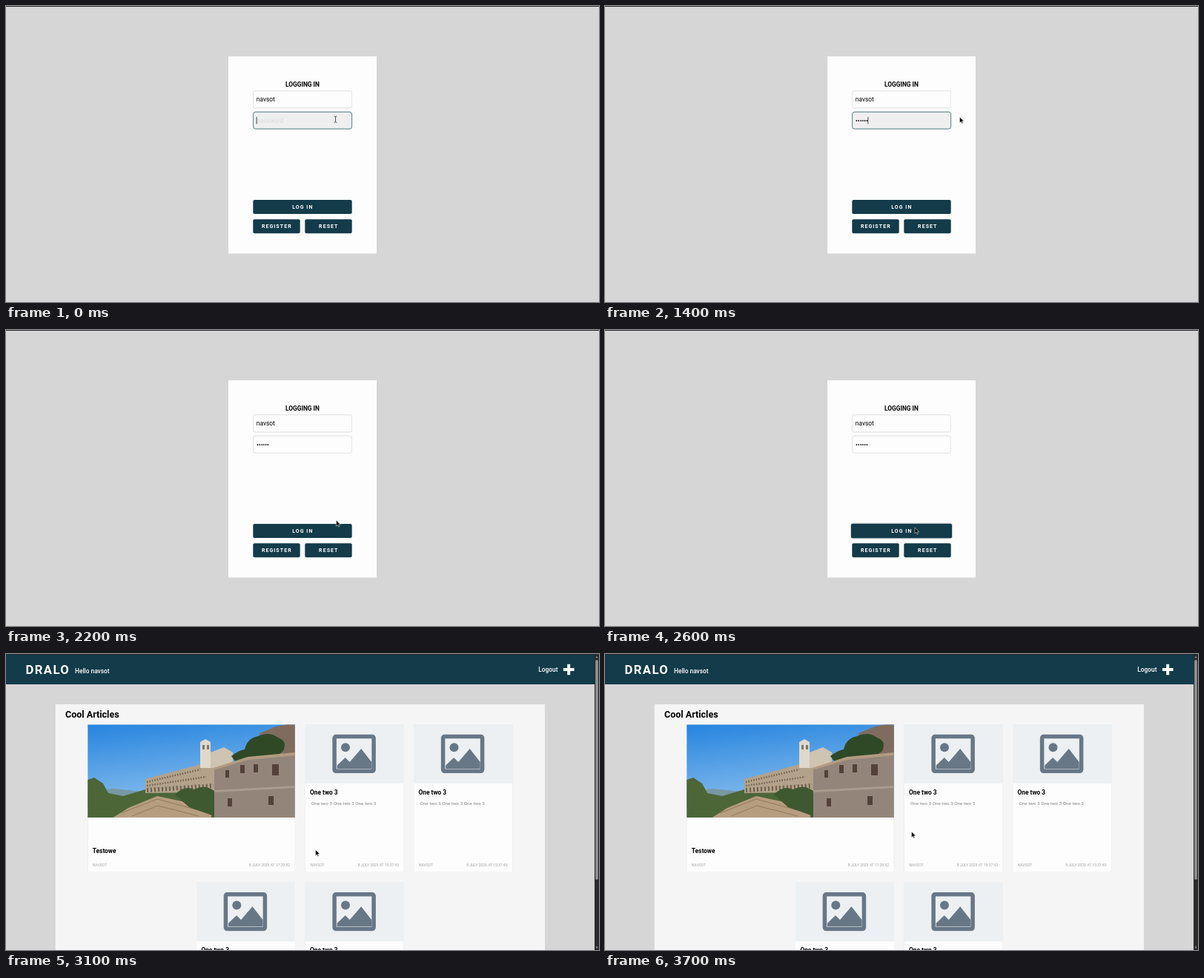
Animation of 800x400 px, one loop 3.8 s. Source, as an HTML page:

```html
<!DOCTYPE html>
<html lang="en">
<head>
<meta charset="utf-8">
<title>Login</title>
<style>
  html, body { margin: 0; width: 100%; height: 100%; overflow: hidden; background: #d6d6d6; }
  svg { display: block; font-family: Roboto, Arial, sans-serif; font-size: 8.35px; }
  .b { font-weight: 700; }
  .m { font-weight: 500; }
  .mid { text-anchor: middle; }
  .end { text-anchor: end; }
  .white { fill: #fff; }
  .btn { font-weight: 700; font-size: 7px; letter-spacing: 1.07px; fill: #fff; text-anchor: middle; }
  .navy { fill: #133b4a; }
  .field { fill: #fdfdfd; stroke: #e9e9e9; stroke-width: .7; filter: drop-shadow(.8px .8px .6px #0004); }
  .field.on { fill: #efefef; stroke: #4d7a80; stroke-width: .9; }
  .card { fill: #fdfdfd; filter: drop-shadow(.5px .5px .7px #0003); }
  .desc { font-size: 6.25px; font-weight: 500; fill: #999; }
  .meta { font-size: 5px; fill: #a2a2a2; }
</style>
</head>
<body>
<svg width="800" height="400" viewBox="0 0 800 400">
  <defs>
    <linearGradient id="sky" x1="0" y1="0" x2=".25" y2="1">
      <stop offset="0" stop-color="#2684df"/>
      <stop offset="1" stop-color="#94c5ee"/>
    </linearGradient>
    <clipPath id="photoBox"><path d="M110.3 95.5h279.5v125.5h-279.5z"/></clipPath>
    <g id="picture">
      <rect width="133" height="79.5" fill="#ecf0f2"/>
      <g fill="#687786">
        <rect x="39.4" y="16" width="53" height="46.8" rx="2" fill="none" stroke="#687786" stroke-width="5.5"/>
        <circle cx="54.3" cy="30.7" r="6"/>
        <path d="M43 59.5v-4.5l11-10.5 6 6 15.5-18 14 18v9z"/>
      </g>
    </g>
  </defs>
  <rect width="800" height="400" fill="#d6d6d6"/>

  <g id="login">
    <rect width="800" height="1" fill="#2a2a2a"/>
    <rect x="300" y="68" width="200" height="266.5" fill="#fdfdfd"/>
    <text class="b mid" x="400" y="109">LOGGING IN</text>
    <rect class="field" x="333.6" y="115" width="133" height="22.8" rx="2"/>
    <text x="337.8" y="129.3">navsot</text>
    <rect id="pass" class="field" x="333.6" y="143.2" width="133" height="22.8" rx="3"/>
    <text id="hint" x="338" y="157.5" fill="#dadada">password</text>
    <text id="dots" x="338" y="157.5"></text>
    <rect id="caret" y="149.8" width=".8" height="9.6" fill="#222"/>
    <rect id="go" class="navy" x="333.3" y="262" width="133.4" height="19" rx="2"/>
    <rect class="navy" x="333.3" y="288.2" width="63.4" height="19" rx="2"/>
    <rect class="navy" x="403.3" y="288.2" width="63.4" height="19" rx="2"/>
    <text class="btn" x="400.3" y="274.2">LOG IN</text>
    <text class="btn" x="365.3" y="300.4">REGISTER</text>
    <text class="btn" x="435.3" y="300.4">RESET</text>
  </g>

  <g id="home">
    <rect class="navy" width="794" height="41"/>
    <text class="b white" x="26.5" y="26.8" font-size="16.7" letter-spacing="1.4">DRALO</text>
    <text class="m white" x="93" y="26">Hello navsot</text>
    <text class="m white" x="718.3" y="23.7">Logout</text>
    <path d="M759.2 13.7v14.6M751.9 21h14.6" stroke="#fff" stroke-width="4"/>
    <rect x="66.7" y="68" width="660.3" height="332" fill="#f5f5f5"/>
    <text class="b" x="80" y="86" font-size="12.5">Cool Articles</text>

    <rect class="card" x="110.3" y="95.5" width="279.5" height="199.3"/>
    <g clip-path="url(#photoBox)">
      <rect x="110" y="95" width="280" height="127" fill="url(#sky)"/>
      <path d="M110 185l35-3 50 5v20h-85z" fill="#7898a2"/>
      <path d="M110 170l9-3 12 8 7 13 20 4 30-9 50-3 60-2v43H110z" fill="#4c6638"/>
      <path d="M188 169l75-20h42v36l-40 2-77 1z" fill="#b3a189"/>
      <path d="M190 173l72-17M190 178l80-12" stroke="#6f6351" stroke-width="2.5" stroke-dasharray="1.5 2"/>
      <path d="M190 184l90-6" stroke="#6c604e" stroke-width="6" stroke-dasharray="2 3"/>
      <path d="M276 133l18-7 12 7v21h-30z" fill="#cfc3b1"/>
      <path d="M262 119l7-4 7 4v35h-14z" fill="#e0d8ca"/>
      <path d="M265 123h3v6h-3zm6 0h3v6h-3z" fill="#7d776f"/>
      <path d="M342 107l22-9 26-5v45h-48z" fill="#806c5e"/>
      <path d="M304 138q10-8 18-9 3-15 18-18 15-7 27 2 13 4 7 18l-14 11-50 4z" fill="#2f4927"/>
      <path d="M281 154l45-14 64-5v87H281z" fill="#93857a"/>
      <path d="M280 154l46-15 64-6v4l-64 6-46 14z" fill="#b29b83"/>
      <path d="M281 184l109-6v3l-109 6z" fill="#a99b8d"/>
      <path d="M316 150h6v11h-6zm18-1h6v11h-6zm25 0h9v15h-9zm-63 8h5v10h-5zm3 38h6v11h-6zm55-3h7v12h-7z" fill="#54413a"/>
      <path d="M143 222l22-14 39-16 33 7 40 15v8z" fill="#b79d80"/>
      <path d="M155 215l49-19 70 19M170 219l35-14 55 14" fill="none" stroke="#927858"/>
      <path d="M228 190q12-13 26-7 14-8 27 2v34l-34-12z" fill="#3e5930"/>
    </g>
    <text class="b" x="116.8" y="269.2">Testowe</text>
    <text class="meta" x="117" y="286.8">NAVSOT</text>
    <text class="meta end" x="383" y="286.8">8 JULY 2025 AT 17:29:52</text>
    <g id="cards"></g>

    <rect x="794" width="6" height="400" fill="#2b2b2b"/>
    <rect width="800" height="1" fill="#2a2a2a"/>
    <rect x="795.2" y="8" width="3.6" height="297" rx="1.8" fill="#949494"/>
    <path d="M795.3 5.2l1.7-2.4 1.7 2.4zM795.3 395.5l1.7 2.4 1.7-2.4z" fill="#949494"/>
  </g>

  <path id="beam" d="M-1.8-4.2q1.8 0 1.8 1v6.4q0 1-1.8 1M1.8-4.2q-1.8 0-1.8 1M0 3.2q0 1 1.8 1" fill="none" stroke="#444" stroke-width=".9"/>
  <path id="arrow" d="M0 0v8l1.9-1.7 1.2 2.8 1.3-.6-1.2-2.7h2.5z" stroke="#fff" stroke-width=".5"/>
</svg>
<script>
const $ = id => document.getElementById(id);
const LOOP = 3800, STEP = 100, HOME_AT = 3100;
const HOVER_AT = 2300, BLUR_AT = 1900;
const typedAt = [400, 500, 700, 900, 1000, 1200];

// time, x, y of the pointer tip
const path = [
  [0, 444.5, 150], [100, 447, 150], [400, 475, 150], [500, 478.5, 150],
  [1400, 478.5, 150], [1700, 506, 166], [1900, 513, 180], [2000, 502, 206],
  [2200, 445.5, 257], [2400, 427, 265], [2600, 418, 267],
  [3200, 417.5, 264], [3600, 414, 242], [3700, 413.5, 240], [3800, 413.5, 240]
];

function pointer(t) {
  const i = path.findIndex(p => p[0] > t);
  const [t0, x0, y0] = path[i - 1], [t1, x1, y1] = path[i];
  const k = (t - t0) / (t1 - t0);
  return [x0 + (x1 - x0) * k, y0 + (y1 - y0) * k];
}

const show = (id, on) => $(id).style.display = on ? '' : 'none';

const card = (x, y, time) => `<g transform="translate(${x} ${y})">
  <rect class="card" width="133" height="199.3"/><use href="#picture"/>
  <text class="b" x="6.4" y="94.2">One two 3</text>
  <text class="desc" x="8.3" y="108.6">One two 3 One two 3 One two 3</text>
  <text class="meta" x="6.7" y="191.3">NAVSOT</text>
  <text class="meta end" x="126.3" y="191.3">8 JULY 2025 AT ${time}</text></g>`;

$('cards').innerHTML = card(403.7, 95.5, '15:37:43') + card(550.2, 95.5, '15:37:40')
  + card(257, 308.8, '15:37:36') + card(403.7, 308.8, '15:37:32');

function draw(now) {
  const t = Math.floor(now % LOOP / STEP) * STEP;
  const home = t >= HOME_AT, focus = t < BLUR_AT;
  const typed = typedAt.filter(at => t >= at).length;
  const [x, y] = pointer(t);
  const overField = x < 467 && y < 163;

  show('login', !home);
  show('home', home);
  show('hint', !typed);
  show('caret', focus);
  $('pass').classList.toggle('on', focus);
  $('dots').textContent = '•'.repeat(typed);
  $('caret').setAttribute('x', 337.7 + 2.8 * typed);

  const grow = Math.max(0, Math.min(1, (t - HOVER_AT + STEP) / 200));
  $('go').setAttribute('transform', `translate(400 271.5) scale(${1 + .02 * grow}) translate(-400 -271.5)`);
  $('go').style.filter = grow ? `drop-shadow(0 .5px 1px rgba(0,0,0,${.4 * grow}))` : '';

  show('beam', overField);
  show('arrow', !overField);
  $('beam').setAttribute('transform', `translate(${x} ${y + 3.2})`);
  $('arrow').setAttribute('transform', `translate(${x} ${y})`);
}

const start = performance.now();
function tick() {
  draw(performance.now() - start);
  requestAnimationFrame(tick);
}
tick();
</script>
</body>
</html>
```
